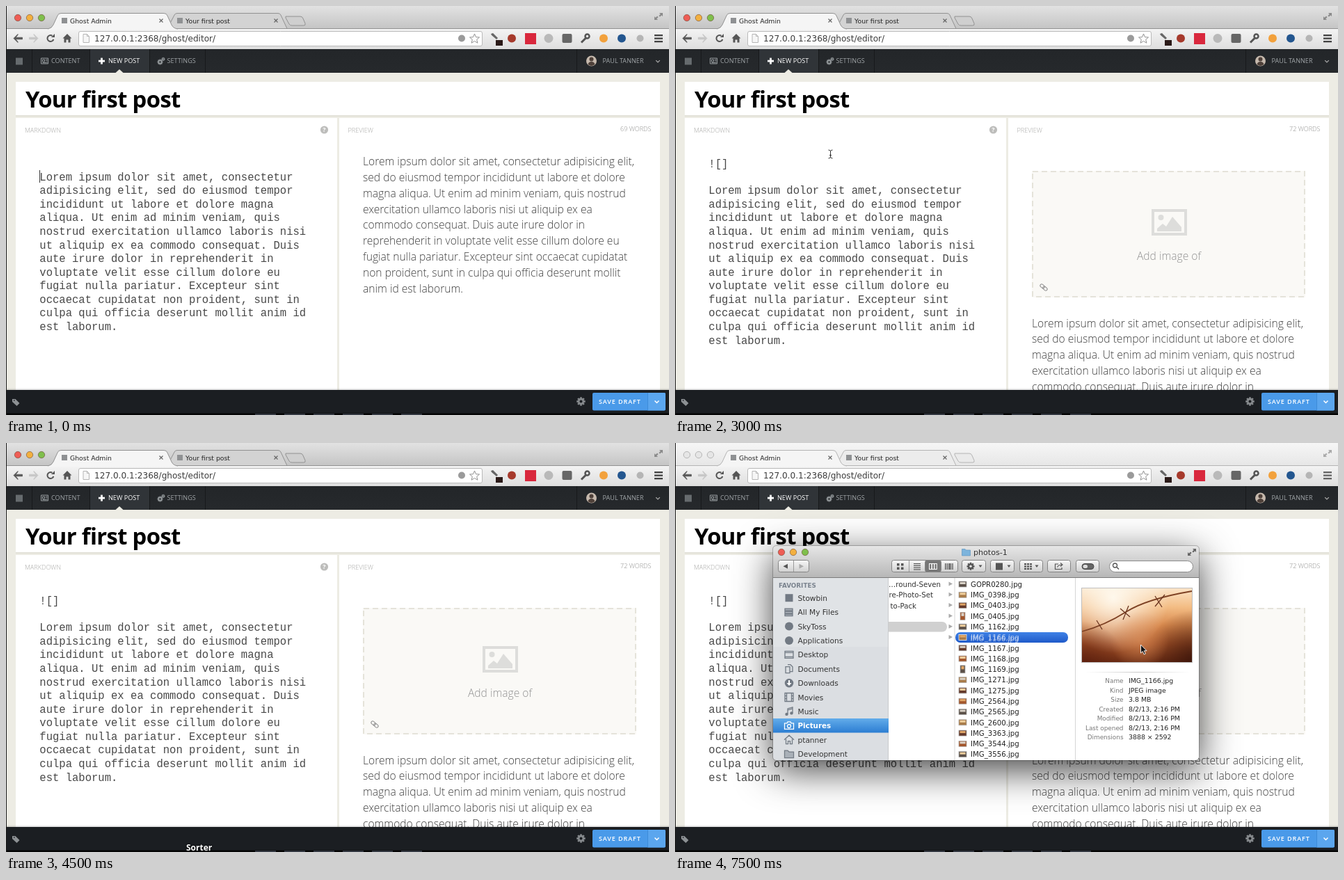
An HTML page with a canvas for the animation above (8000 ms loop, 953 by 588 pixels).

```html
<!DOCTYPE html>
<html lang="en">
<head>
<meta charset="utf-8">
<title>Editor demo</title>
<style>
html, body { margin: 0; width: 100%; height: 100%; overflow: hidden; background: #000; }
canvas { display: block; width: 953px; height: 588px; }
</style>
</head>
<body>
<canvas id="stage" width="953" height="588"></canvas>
<script>
const c = document.getElementById('stage').getContext('2d');
const LOOP = 8000, STEP = 1500;
const OPEN = '"Open Sans", sans-serif';
const SYS = '"DejaVu Sans", sans-serif';
const MONO = '"Liberation Mono", monospace';

const MARKDOWN = [
  'Lorem ipsum dolor sit amet, consectetur', 'adipisicing elit, sed do eiusmod tempor',
  'incididunt ut labore et dolore magna', 'aliqua. Ut enim ad minim veniam, quis',
  'nostrud exercitation ullamco laboris nisi', 'ut aliquip ex ea commodo consequat. Duis',
  'aute irure dolor in reprehenderit in', 'voluptate velit esse cillum dolore eu',
  'fugiat nulla pariatur. Excepteur sint', 'occaecat cupidatat non proident, sunt in',
  'culpa qui officia deserunt mollit anim id', 'est laborum.'];
const PREVIEW = [
  'Lorem ipsum dolor sit amet, consectetur adipisicing elit,',
  'sed do eiusmod tempor incididunt ut labore et dolore',
  'magna aliqua. Ut enim ad minim veniam, quis nostrud',
  'exercitation ullamco laboris nisi ut aliquip ex ea',
  'commodo consequat. Duis aute irure dolor in',
  'reprehenderit in voluptate velit esse cillum dolore eu',
  'fugiat nulla pariatur. Excepteur sint occaecat cupidatat',
  'non proident, sunt in culpa qui officia deserunt mollit',
  'anim id est laborum.'];
const PLACES = ['Stowbin', 'All My Files', 'SkyToss', 'Applications', 'Desktop', 'Documents',
  'Downloads', 'Movies', 'Music', 'Pictures', 'ptanner', 'Development'];
const FILES = ['GOPR0280', 'IMG_0398', 'IMG_0403', 'IMG_0405', 'IMG_1162', 'IMG_1166', 'IMG_1167',
  'IMG_1168', 'IMG_1169', 'IMG_1271', 'IMG_1275', 'IMG_2564', 'IMG_2565', 'IMG_2600',
  'IMG_3363', 'IMG_3544', 'IMG_3556'];
const INFO = [['Name', 'IMG_1166.jpg'], ['Kind', 'JPEG image'], ['Size', '3.8 MB'],
  ['Created', '8/2/13, 2:16 PM'], ['Modified', '8/2/13, 2:16 PM'],
  ['Last opened', '8/2/13, 2:16 PM'], ['Dimensions', '3888 × 2592']];

function text(s, x, y, font, color, align = 'left', spacing = 0) {
  c.font = font;
  c.fillStyle = color;
  c.textAlign = align;
  c.letterSpacing = spacing + 'px';
  c.fillText(s, x, y);
}
function rect(x, y, w, h, fill) { c.fillStyle = fill; c.fillRect(x, y, w, h); }
function box(x, y, w, h, r, fill, stroke) {
  c.beginPath();
  c.roundRect(x, y, w, h, r);
  paint(fill, stroke);
}
function paint(fill, stroke, width = 1) {
  if (fill) { c.fillStyle = fill; c.fill(); }
  if (stroke) { c.strokeStyle = stroke; c.lineWidth = width; c.stroke(); }
}
function disc(x, y, r, fill, stroke, width) {
  c.beginPath();
  c.arc(x, y, r, 0, 7);
  paint(fill, stroke, width);
}
// Paths use SVG syntax, relative to (x, y).
function shape(x, y, d, fill, stroke, width = 1) {
  c.save();
  c.translate(x, y);
  const p = new Path2D(d);
  if (fill) { c.fillStyle = fill; c.fill(p); }
  if (stroke) { c.strokeStyle = stroke; c.lineWidth = width; c.stroke(p); }
  c.restore();
}
function fade(y0, y1, ...colors) {
  const g = c.createLinearGradient(0, y0, 0, y1);
  colors.forEach((k, i) => g.addColorStop(i / (colors.length - 1), k));
  return g;
}
function glow(x, y, r, rgb, alpha) {
  const g = c.createRadialGradient(x, y, 0, x, y, r);
  g.addColorStop(0, `rgba(${rgb},${alpha})`);
  g.addColorStop(1, `rgba(${rgb},0)`);
  disc(x, y, r, g);
}
function clipped(x, y, w, h, draw) {
  c.save();
  c.beginPath();
  c.rect(x, y, w, h);
  c.clip();
  draw();
  c.restore();
}
function gear(x, y, r, color, hole) {
  for (let i = 0; i < 8; i++) {
    c.save();
    c.translate(x, y);
    c.rotate(i * Math.PI / 4);
    rect(-r * .22, -r, r * .44, r, color);
    c.restore();
  }
  disc(x, y, r * .75, color);
  disc(x, y, r * .32, hole);
}
function trafficLights(x, y, step, active) {
  ['#ee5d55', '#f3b03f', '#7fbf4c'].forEach((k, i) =>
    disc(x + i * step, y, 4.7, active ? k : '#e6e6e6', active ? 'rgba(90,50,30,.5)' : '#b5b5b5', 1));
}
function expandArrows(x, y, color) {
  shape(x, y, 'M1 -5H6V0L4.3 -1.7 2 .6 .4 -1 2.7 -3.3ZM-1 5H-6V0L-4.3 1.7 -2 -.6 -.4 1 -2.7 3.3Z', color);
}

function browser(active) {
  rect(0, 0, 953, 33, active ? fade(0, 33, '#e2e2e2', '#c4c4c4') : fade(0, 33, '#f6f6f6', '#e6e6e6'));
  trafficLights(17, 17, 17, active);
  const edge = active ? '#929292' : '#b4b4b4';
  shape(0, 0, 'M232 32.5L242 13Q243 10.500 246 10.500H391Q394 10.500 395 13L404 32.500Z',
    active ? '#d3d3d3' : '#ececec', edge);
  shape(0, 0, 'M402 15H423Q426 15 427 18L430 25Q431 28 428 28H411Q408 28 407 26L402 17Z',
    active ? '#cfcfcf' : '#eaeaea', edge);
  rect(0, 32, 953, 30, fade(32, 62, '#f4f4f4', '#dedede'));
  rect(0, 32, 953, 1, edge);
  shape(0, 0, 'M60 33Q66 32 68 27L74 14Q75 10.500 79 10.500H227Q231 10.500 232 14L238 27Q240 32 247 33',
    '#f5f5f5', edge);
  rect(62, 33, 183, 1, '#f5f5f5');
  [[80, 'Ghost Admin', 92, 223], [246, 'Your first post', 258, 388]].forEach(([ix, s, x, close]) => {
    rect(ix, 17, 8, 8, '#8f9193');
    text(s, x, 24.5, '9.3px ' + SYS, '#222');
    shape(close, 21, 'M-2.500 -2.500L2.500 2.500M2.500 -2.500L-2.500 2.500', null, '#666', 1.2);
  });
  expandArrows(938, 15, active ? '#8a8a8a' : '#aaa');

  const arrow = 'M-6 0L0 -6V-5L-3 -1.300H6.500V1.300H-3L0 5V6Z';
  shape(17, 46.5, arrow, '#555', '#555', .8);
  shape(40, 46.5, 'M6 0L0 -6V-5L3 -1.300H-6.500V1.300H3L0 5V6Z', '#c6c6c6', '#c6c6c6', .8);
  c.beginPath();
  c.arc(64, 46.5, 4.5, .3, 5.3);
  paint(null, '#555', 2);
  shape(64, 46.5, 'M1 -1.500H6V-6.500Z', '#555');
  shape(88, 46.5, 'M-6.500 0L0 -6.500 6.500 0H4.500V6H1.500V2H-1.500V6H-4.500V0Z', '#555');

  box(104.5, 36.5, 580, 21, 2.5, '#fff', '#b9b9b9');
  shape(115, 46.5, 'M-4 -6H1.500L4.500 -3V6H-4ZM1.500 -6V-3H4.500', '#f6f6f6', '#b5b5b5');
  text('127.0.0.1:2368/ghost/editor/', 127, 50.7, '12.1px ' + SYS, '#3c3c3c');
  disc(655, 46.5, 5, '#9a9a9a');
  shape(673.5, 47, 'M0 -7L2 -2.300 7 -2 3.200 1.300 4.400 6.200 0 3.500 -4.400 6.200 -3.200 1.300 -7 -2 -2 -2.300Z',
    '#fff', '#909090');

  shape(704, 46, 'M-7 -6L-4 -7 3 0 1 2 -6 -4Z', '#666');
  rect(704, 49, 10, 8, '#2b1a18');
  disc(727, 46.5, 6, '#a63a2c');
  rect(746, 39, 16, 16, '#d9283d');
  disc(780, 46.5, 6.5, '#b9b9b9');
  box(799.5, 40, 14, 13, 2, '#666');
  shape(833, 46.5, 'M-6 6L1 -1', null, '#555', 3);
  disc(835.5, 43.5, 3, null, '#555', 2.5);
  disc(859, 46.5, 6, '#f2a13c');
  disc(885, 46.5, 6, '#23568f');
  disc(911.5, 46.5, 5, '#b5b5b5');
  for (let i = 0; i < 3; i++) rect(932, 41 + i * 4.5, 12, 2.3, active ? '#444' : '#666');
}

function navBar() {
  rect(0, 62, 953, 34, fade(62, 96, '#232629', '#26292c'));
  rect(120, 62, 86, 34, '#303438');
  [37, 120, 206, 286, 820].forEach(x => rect(x, 62, 1, 34, '#17191b'));
  const font = '9.1px ' + OPEN, dim = '#a0a5a8';
  rect(14, 74.5, 10, 10, '#666b6e');
  shape(55.5, 79, 'M-5 -4H5V4H-5ZM-3 -2H0V1H-3ZM1.500 -2H4M1.500 0H4M-3 2.500H4', null, '#959a9d');
  text('CONTENT', 65, 82.4, font, dim);
  rect(133, 77.7, 9, 2.8, '#fff');
  rect(136.1, 74.6, 2.8, 9, '#fff');
  text('NEW POST', 147, 82.4, font, '#fff');
  gear(221.5, 80.5, 4, '#959a9d', '#26292c');
  gear(226, 76.3, 2.5, '#959a9d', '#26292c');
  text('SETTINGS', 231.5, 82.4, font, dim);
  shape(163, 96, 'M-5.500 0L0 -5 5.500 0Z', '#edece4');
  // avatar: plain silhouette
  disc(841.5, 79, 7.5, '#c6b9ad');
  disc(841.5, 76.5, 3, '#4e4039');
  shape(841.5, 79, 'M-5 5Q-4 1 0 1 4 1 5 5 0 9 -5 5Z', '#4e4039');
  text('PAUL TANNER', 857.5, 82.4, font, dim);
  shape(937, 79.5, 'M-2.800 -1.400L0 1.400 2.800 -1.400', null, '#aaa', 1.3);
}

function imageSlot() {
  rect(513, 237, 393, 182, '#faf9f6');
  c.setLineDash([8, 5]);
  c.strokeStyle = '#e5e3da';
  c.lineWidth = 2;
  c.strokeRect(514, 238, 391, 180);
  c.setLineDash([]);
  c.strokeStyle = '#dddddb';
  c.lineWidth = 4;
  c.strokeRect(687, 294, 47, 34);
  disc(698.5, 304, 4, '#dddddb');
  shape(0, 0, 'M693 324V320L701 313 706 317 715 303 728 318V324Z', '#dddddb');
  text('Add image of', 710, 364.5, '300 15.6px ' + OPEN, '#929292', 'center');
  c.save();
  c.translate(530, 404.5);
  c.rotate(.7);
  box(-6, -2.2, 7, 4.4, 2.2, null, '#8e8e8e');
  box(-1, -2.2, 7, 4.4, 2.2, null, '#8e8e8e');
  c.restore();
}

function editor(scene) {
  rect(0, 96, 953, 456, '#edece4');
  rect(14, 109, 926, 50, '#e2e1d8');
  rect(14, 109, 926, 48, '#fff');
  rect(14, 161, 462, 391, '#fff');
  rect(479, 161, 461, 391, '#fff');
  text('Your first post', 28, 146, 'bold 32.8px ' + OPEN, '#000', 'left', -.65);

  const small = '300 9.1px ' + OPEN, pale = '#a4a4a2';
  text('MARKDOWN', 27, 181.5, small, pale);
  text('PREVIEW', 491.5, 181.5, small, pale);
  text((scene < 2 ? 69 : 72) + ' WORDS', 927.5, 180.3, small, '#8e8e8c', 'right');
  disc(457.5, 178, 5.6, '#bdbdbb');
  text('?', 457.5, 181.4, 'bold 9px ' + OPEN, '#fff', 'center');

  const mono = '15.57px ' + MONO;
  const top = scene ? 270.3 : 250.7;
  MARKDOWN.forEach((s, i) => text(s, 48.3, top + i * 19.57, mono, '#484848'));
  if (scene < 2) rect(48, scene ? 217 : 236, 1, 18, '#333');
  else text('![]', 48.3, 231.5, mono, '#484848');

  const filled = scene > 1;
  clipped(479, 161, 461, 391, () => {
    if (filled) imageSlot();
    PREVIEW.forEach((s, i) =>
      text(s, 513, (filled ? 461.5 : 228.8) + i * 22.9, '300 15.63px ' + OPEN, '#3e3e3e'));
  });
  if (scene === 4) box(932.5, 195, 6.5, 242, 3, '#7c7c7c');
}

function bottomBar() {
  rect(0, 549, 953, 3, fade(549, 552, 'rgba(0,0,0,0)', 'rgba(0,0,0,.14)'));
  rect(0, 552, 953, 34, '#1b1e22');
  rect(0, 585.5, 953, 2.5, '#050505');
  for (let x = 358; x < 610; x += 42) rect(x, 586, 30, 2, '#343842');
  shape(14, 569.5, 'M-5 -4.500H-.5L5.500 1.500 1.500 5.500 -5 -.5ZM-3 -3.200V-1.700H-1.500V-3.200Z', '#8d9194');
  gear(826.5, 568.5, 6.2, '#85898c', '#1b1e22');
  box(843, 556, 105, 25.5, 2, '#4a9ae9');
  box(923, 556, 25, 25.5, [0, 2, 2, 0], '#5ba6ee');
  rect(922, 556, 1, 25.5, '#3d8bd8');
  text('SAVE DRAFT', 852, 572, '600 9.1px ' + OPEN, '#fff', 'left', .85);
  shape(935.5, 569, 'M-3 -1.500L0 1.500 3 -1.500', null, '#fff', 1.5);
}

function button(x, w, pressed) {
  box(x + .5, 168.5, w - 1, 17, 3, pressed ? '#777' : fade(168, 186, '#f8f8f8', '#cfcfcf'), '#858585');
}
function caret(x) { shape(x, 177, 'M-2.500 -1.500H2.500L0 2Z', '#555'); }

function toolbar() {
  rect(141, 148, 612, 46, fade(148, 194, '#e6e6e6', '#b6b6b6'));
  rect(141, 193, 612, 1, '#7b7b7b');
  trafficLights(153, 157, 17, true);
  shape(418.5, 157, 'M-6 -4.500H-1.500L0 -3H6V5H-6Z', '#7db4dc', '#5f96bf', .7);
  text('photos-1', 429, 161, '11.1px ' + SYS, '#333');
  expandArrows(743, 157, '#666');
  button(148, 45);
  rect(170, 169, 1, 16, '#999');
  shape(159, 177.3, 'M-3.500 0L3 -3.500V3.500Z', '#555');
  shape(181.5, 177.3, 'M3.500 0L-3 -3.500V3.500Z', '#aaa');
  button(311, 96);
  button(359, 24, true);
  rect(336, 169, 1, 16, '#999');
  for (let i = 0; i < 4; i++) {
    rect(319 + (i % 2) * 6, 173 + (i >> 1) * 5.5, 3.5, 3.5, '#555');
    rect(343, 173 + i * 2.8, 10, 1.2, '#555');
  }
  c.strokeStyle = '#fff';
  for (let i = 0; i < 3; i++) c.strokeRect(365.5 + i * 3.6, 173.5, 3.6, 8);
  for (let i = 0; i < 5; i++) rect(388 + i * 2.6, 173, i === 2 ? 2 : 1.3, 9, '#555');
  button(412, 35);
  gear(425, 177.3, 5.5, '#555', '#e3e3e3');
  caret(439);
  button(453, 35);
  rect(461, 172.5, 10, 10, '#555');
  caret(480);
  button(495, 34);
  for (let i = 0; i < 9; i++) rect(502 + (i % 3) * 4, 173 + (i / 3 | 0) * 3.4, 3, 2.2, '#555');
  caret(520);
  button(535, 34);
  shape(552, 177, 'M-1 -3H-5.500V4.500H4V2M-2.500 1.500Q-1 -2 4 -2M2 -4.500L5 -2 2 .5', null, '#555', 1.2);
  button(576, 34);
  box(585, 173.5, 17, 8, 4, '#666', '#444');
  box(586.5, 175, 6.5, 5, 2.5, '#ddd');
  box(624.5, 169.5, 120, 16, 8, '#fff', '#8a8a8a');
  disc(632.5, 176, 3, null, '#555', 1.3);
  shape(635, 178.5, 'M0 0L3 3', null, '#555', 1.5);
}

const PLACE_ICONS = {
  1: 'M-6 -5H5V-2H-6ZM-6 -1H5V2H-6ZM-6 3H5V5.500H-6Z',
  4: 'M-6 -5H6V5H-6ZM-6 -3H6V3H-6Z',
  5: 'M-5 -3H1V6H-5ZM-2 -6H2L5 -3V4H1',
  7: 'M-6 -6H6V6H-6ZM-3.500 -6V6M3.500 -6V6M-6 -2H-3.500M-6 2H-3.500M3.500 -2H6M3.500 2H6',
  8: 'M-2 4V-4L5 -6V2M-2 -2L5 -4',
  9: 'M-6.500 -3.500H-3L-2 -5.500H2L3 -3.500H6.500V5H-6.500ZM-2.500 .7A2.500 2.500 0 1 1 2.500 .7A2.500 2.500 0 1 1 -2.500 .7',
  10: 'M-7 0L0 -6.500 7 0M-4.500 -1V6H-1.500V2H1.500V6H4.500V-1',
  11: 'M-6.500 -5H-2L0 -3H6.500V5.500H-6.500Z'
};

function placeIcon(i, y) {
  const k = '#727a84', x = 164;
  if (i === 0) rect(x - 5.5, y - 5.5, 11, 11, k);
  else if (i === 2 || i === 3) disc(x, y, 6, k);
  else if (i === 6) {
    disc(x, y, 6.3, k);
    shape(x, y, 'M-1 -4H1V0H3.500L0 4 -3.500 0H-1Z', '#fff');
  } else {
    const fill = [1, 11].includes(i) ? '#a9b0b8' : null;
    shape(x, y, PLACE_ICONS[i], fill, i === 9 ? '#fff' : k, 1.3);
    if (i === 8) { disc(x - 3.5, y + 4, 2.2, k); disc(x + 3.5, y + 2.5, 2.2, k); }
  }
}

function sidebar() {
  rect(141, 194, 166, 262, '#dbdee2');
  rect(141, 194, 166, 99, 'rgba(255,255,255,.15)');
  rect(306.5, 194, 1, 262, '#b4b4b4');
  text('FAVORITES', 149, 207.5, 'bold 8.8px ' + SYS, '#7a838e');
  PLACES.forEach((s, i) => {
    const y = 222.7 + i * 20.4, on = i === 9;
    if (on) rect(141, 396, 166, 20.5, fade(396, 416, '#62acea', '#2e7fd3'));
    placeIcon(i, y);
    text(s, 176.5, y + 4, (on ? 'bold 10.3px ' : '10.6px ') + SYS, on ? '#fff' : '#333');
  });
}

function photo() {
  clipped(585, 209, 158, 106, () => {
    rect(585, 209, 158, 106, fade(209, 315, '#fbe3c6', '#f3bd85', '#d98a4e', '#a9562a', '#6b2c14'));
    glow(630, 222, 80, '255,250,240', .95);
    glow(585, 318, 62, '90,28,12', .75);
    glow(748, 312, 72, '50,16,8', .8);
    glow(668, 284, 42, '222,146,92', .6);
    c.save();
    c.filter = 'blur(.6px)';
    shape(0, 0, 'M585 271Q618 262 648 243T743 213', null, '#7d4124', 1.8);
    shape(0, 0, 'M606 255L614 268M640 238L654 250M652 234L644 254M690 220L700 236M704 218L690 235', null, '#6b3520', 1.3);
    c.restore();
  });
  c.strokeStyle = 'rgba(0,0,0,.25)';
  c.lineWidth = 1;
  c.strokeRect(584.5, 208.5, 159, 107);
}

function columns(dragging) {
  rect(307, 194, 446, 262, '#fff');
  const font = '10.2px ' + SYS;
  clipped(307, 194, 95, 262, () => {
    text('…round-Seven', 382, 207, font, '#333', 'right');
    text('re-Photo-Set', 371, 222.3, font, '#333', 'right');
    text('to-Pack', 347, 237.6, font, '#333', 'right');
    box(300, 257, 91, 14.5, 7, '#d0d0d0');
  });
  for (let i = 0; i < 6; i++) shape(396, 202.5 + i * 15.3, 'M-2.500 -3L3 0 -2.500 3Z', '#aaa');
  rect(401.5, 194, 1, 262, '#d5d5d5');
  rect(575, 194, 1, 262, '#d5d5d5');
  clipped(402, 194, 173, 262, () => FILES.forEach((s, i) => {
    const y = 203 + i * 15.29, on = i === 5, name = s + '.jpg';
    if (on) box(403, 272, 162, 15, 7, fade(272, 287, '#3f82e6', '#1f5ac9'));
    const tall = i === 3 || i === 8, w = tall ? 7 : 11, h = tall ? 11 : 8;
    rect(413.5 - w / 2, y - h / 2, w, h, ['#5b5048', '#a3562c', '#64392a', '#a97c49'][i * 3 % 4]);
    rect(415 - w / 2, y - h / 2 + 1, w - 3, h / 2 - 1, ['#d9d2c8', '#efcf9d', '#e0a667'][i % 3]);
    c.strokeStyle = on ? '#fff' : '#aaa';
    c.lineWidth = .7;
    c.strokeRect(413.5 - w / 2, y - h / 2, w, h);
    c.globalAlpha = on && dragging ? .6 : 1;
    text(name, 425, y + 3.8, font, on ? '#fff' : '#222');
    // translucent copy that starts to leave the row
    if (on && dragging) text(name, 424.5, y + 6, font, '#fff');
    c.globalAlpha = 1;
  }));
  photo();
  const line = c.createLinearGradient(590, 0, 740, 0);
  line.addColorStop(0, '#fff');
  line.addColorStop(.5, '#c8c8c8');
  line.addColorStop(1, '#fff');
  rect(590, 329, 150, 1, line);
  INFO.forEach(([label, value], i) => {
    const y = 345.3 + i * 13.5;
    text(label, 644.5, y, '8.9px ' + SYS, '#777', 'right');
    text(value, 652, y, '9.4px ' + SYS, '#222');
  });
}

function fileWindow(dragging) {
  c.save();
  c.shadowColor = 'rgba(0,0,0,.75)';
  c.shadowBlur = 54;
  c.shadowOffsetY = 14;
  box(141, 148, 612, 308, 5, '#ccc');
  c.restore();
  c.save();
  c.beginPath();
  c.roundRect(141, 148, 612, 308, 5);
  c.clip();
  toolbar();
  sidebar();
  columns(dragging);
  c.restore();
  box(140.5, 147.5, 613, 309, 5, null, 'rgba(0,0,0,.22)');
}

function pointer(x, y) {
  shape(x, y, 'M0 0V12L2.700 9.500 4.700 14 6.800 13 4.900 8.700H8.500Z', '#111', '#fff', .9);
}

function draw(scene) {
  const windowOpen = scene > 3;
  browser(!windowOpen);
  navBar();
  editor(scene);
  bottomBar();
  rect(0, 0, 1, 588, '#1a1a1a');
  if (scene === 2)
    shape(223.5, 213, 'M-3 -6Q0 -6 0 -4Q0 -6 3 -6M0 -4V4M-3 6Q0 6 0 4Q0 6 3 6M-1.500 1.500H1.500', null, '#333');
  if (scene === 3) {
    c.save();
    c.shadowColor = '#000';
    c.shadowBlur = 4;
    text('Sorter', 259, 586.3, 'bold 12px ' + OPEN, '#fff');
    c.restore();
  }
  if (windowOpen) {
    fileWindow(scene === 5);
    if (scene === 4) pointer(512, 367);
    else pointer(669.5, 290);
  }
}

const start = performance.now();
function tick() {
  draw(Math.floor((performance.now() - start) % LOOP / STEP));
  requestAnimationFrame(tick);
}
tick();
</script>
</body>
</html>
```
